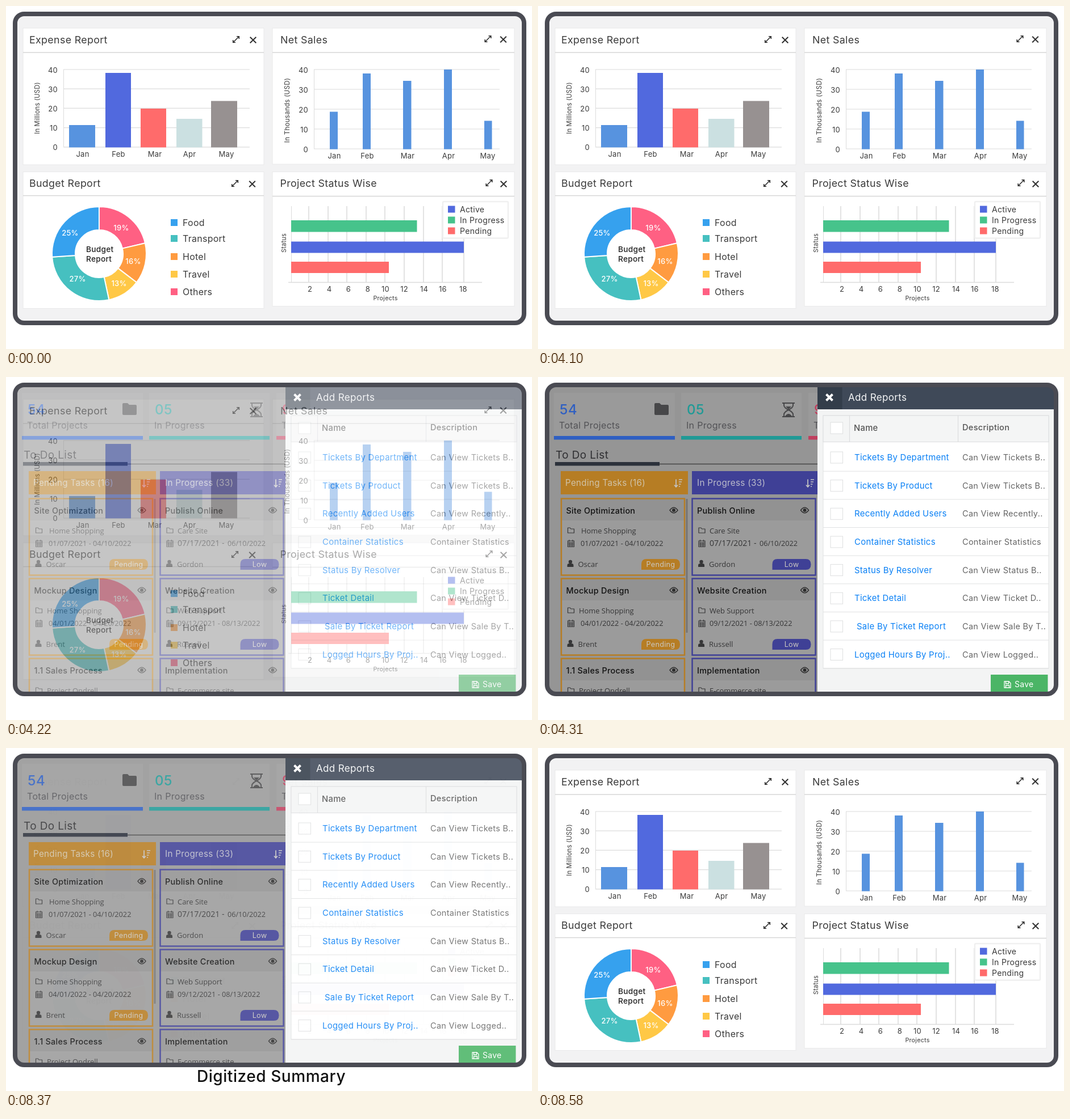
Write an HTML page that moves like this. It is 926 px wide and 605 px high and loops after 9580 ms.

```html
<!DOCTYPE html>
<html lang="en">
<head>
<meta charset="utf-8">
<title>Reports</title>
<style>
html, body { margin: 0; width: 100%; height: 100%; overflow: hidden; background: #fff; }
svg { display: block; width: 926px; height: 605px; }
text { font-family: Inter, sans-serif; letter-spacing: .02em; white-space: pre; }
.plain { font-family: "Open Sans", sans-serif; letter-spacing: 0; }
.bold { font-weight: 500; }
.mid { text-anchor: middle; }
.end { text-anchor: end; }
</style>
</head>
<body>
<svg id="stage" viewBox="0 0 926 605"></svg>
<script>
const LOOP = 9580;

const rect = (x, y, w, h, fill, more = '') =>
  `<rect x="${x}" y="${y}" width="${w}" height="${h}" fill="${fill}" ${more}/>`;
const text = (x, y, str, size, fill, cls = '', more = '') =>
  `<text x="${x}" y="${y}" font-size="${size}" fill="${fill}" class="${cls}" ${more}>${str}</text>`;
const path = (d, stroke, width = 1, fill = 'none', more = '') =>
  `<path d="${d}" stroke="${stroke}" stroke-width="${width}" fill="${fill}" ${more}/>`;
const at = (x, y, body) => `<g transform="translate(${x} ${y})">${body}</g>`;
const each = (list, fn) => list.map(fn).join('');

const INK = '#3b3b3b', GRID = '#dcdcdc', BLUE = '#5793df', INDIGO = '#5169de', RED = '#ff6b6b';

/* ---------- dashboard ---------- */

const cross = (x, y, r, color, width) =>
  at(x, y, path(`M${-r} ${-r}L${r} ${r}M${r} ${-r}L${-r} ${r}`, color, width));
const expand = (x, y) =>
  at(x, y, path('M-5 5L5 -5M1 -5.3H5.3V-1M-5.3 1V5.3H-1', '#333', 1.6));

function panel(x, y, w, h, line, title, tx, icons) {
  const [ex, ey, cx, cy] = icons;
  return rect(x, y, w, h, '#fff', 'stroke="#e9e9ea"') +
    path(`M${x} ${line}h${w}`, '#d6d6d6', 1.5) +
    text(tx, y + 26.5, title, 17.8, INK) +
    expand(ex, ey) + cross(cx, cy, 5.3, '#333', 2);
}

const sideTitle = (x, y, str, size) =>
  text(0, 0, str, size, INK, 'mid', `transform="translate(${x} ${y}) rotate(-90)"`);

function columns(x0, x1, y0, step, labelX, bars, nameY) {
  const base = y0 + 4 * step;
  return each([40, 30, 20, 10, 0], (n, i) =>
      path(`M${x0} ${y0 + i * step}H${x1}`, GRID, 1.2) +
      text(labelX, y0 + i * step + 5.5, n, 13, INK, 'end')) +
    path(`M${x0 + .5} ${y0}V${base}`, GRID) +
    each(bars, ([name, x, w, top, fill, mid]) =>
      rect(x, top, w, base + .6 - top, fill) + text(mid, nameY, name, 13, INK, 'mid'));
}

function slice(from, to, fill) {
  const p = (deg, r) => {
    const a = deg * Math.PI / 180;
    return `${(164 + r * Math.sin(a)).toFixed(1)} ${(437 - r * Math.cos(a)).toFixed(1)}`;
  };
  return path(`M${p(from, 42)}L${p(from, 83)}A83 83 0 0 1 ${p(to, 83)}L${p(to, 42)}A42 42 0 0 0 ${p(from, 42)}`,
    '#fff', 2, fill);
}

const SLICES = [
  [0, 77, '#ff6083', '19%', 203, 396], [77, 127.5, '#ff9b40', '16%', 224, 455],
  [127.5, 168, '#ffc846', '13%', 199, 494], [168, 266, '#46c0c0', '27%', 126, 486],
  [266, 360, '#36a1ee', '25%', 113, 405]];
const BUDGET = [
  ['Food', 382, '#36a1ee'], ['Transport', 410, '#46c0c0'], ['Hotel', 442, '#ff9b40'],
  ['Travel', 473, '#ffc846'], ['Others', 504, '#ff6083']];

const dashboard = () =>
  rect(16, 14, 896, 545, '#f2f2f3') +

  panel(30, 39, 424, 241, 82, 'Expense Report', 41, [405, 59, 435, 60]) +
  columns(101, 429, 112, 34.2, 91, [
    ['Jan', 111, 46, 210, BLUE, 135], ['Feb', 175, 45, 118, INDIGO, 198],
    ['Mar', 237, 45, 181, RED, 262], ['Apr', 300, 45.5, 199, '#cbe0e1', 323],
    ['May', 361, 46, 167.5, '#979191', 388]], 266) +
  sideTitle(59, 180, 'In Millions (USD)', 11.2) +

  panel(469, 39, 426, 240, 82, 'Net Sales', 483, [848.5, 58, 875.5, 59]) +
  columns(542, 869, 112, 35, 532, [
    ['Jan', 570, 14, 186.5, BLUE, 578], ['Feb', 628, 14, 119, BLUE, 636],
    ['Mar', 699, 14.5, 132, BLUE, 707], ['Apr', 771, 14, 112, BLUE, 779],
    ['May', 842, 13.5, 202.5, BLUE, 848]], 269) +
  sideTitle(499, 184, 'In Thousands (USD)', 11.6) +

  panel(30, 292.5, 424, 241, 334.5, 'Budget Report', 41, [403, 313, 433.5, 314]) +
  each(SLICES, ([from, to, fill]) => slice(from, to, fill)) +
  each(SLICES, ([, , , label, x, y]) => text(x, y, label, 13, '#fff', 'mid bold')) +
  text(141, 434, 'Budget', 13.7, '#222', 'bold') + text(141, 451, 'Report', 13.7, '#222', 'bold') +
  each(BUDGET, ([name, y, fill]) => rect(290, y - 6, 12, 12, fill) + text(311, y + 5.5, name, 15.9, INK)) +

  panel(469, 292.5, 426, 237, 335.5, 'Project Status Wise', 482.5, [850.5, 312, 876, 314]) +
  path('M502.5 353V487', GRID) +
  each([533, 567, 600, 634, 667, 701, 735, 768, 806], (x, i) =>
    path(`M${x} 353V487`, GRID, 1.6) +
    text([535, 569, 603, 637, 668, 701, 736, 769, 805][i], 504, 2 * i + 2, 13, INK, 'mid')) +
  path('M497 487.5H838', GRID, 1.3) +
  rect(502, 378, 221.5, 20.5, '#46c38b') + rect(502, 415.5, 304, 20, INDIGO) + rect(502, 451, 172, 20, RED) +
  sideTitle(493, 418, 'Status', 11) + text(668, 519, 'Projects', 10.8, INK, 'mid') +
  rect(769, 345, 115, 64.5, '#fff', 'rx="2" stroke="#f0f0f0" stroke-width="2.5"') +
  each([['Active', 358.5, INDIGO], ['In Progress', 377.5, '#46c38b'], ['Pending', 396.5, RED]],
    ([name, y, fill]) => rect(778, y - 6, 12.5, 12, fill) + text(799, y + 5.5, name, 14.1, INK));

/* ---------- task board with side drawer ---------- */

const ORANGE = '#b67d24', VIOLET = '#3f4096', DIM = '#363637';

const folder = (x, y) =>
  at(x, y, path('M-5.5 4.5V-4.5H-1.5L0 -2.5H5.5V4.5Z', DIM, 1.2, 'none', 'stroke-linejoin="round"'));
const calendar = (x, y) =>
  at(x, y, path('M-5.5 -4.5H5.5V6H-5.5ZM-5.5 -1.5H5.5M-5.5 1H5.5M-5.5 3.5H5.5M-2 -1.5V6M2 -1.5V6M-3 -6.5V-3M3 -6.5V-3', DIM, 1.1));
const person = (x, y) =>
  at(x, y, `<circle cy="-3" r="3.2" fill="${DIM}"/>` + path('M-5.5 6V3Q-5.5 0 -2 0H2Q5.5 0 5.5 3V6Z', 'none', 0, DIM));
const eye = (x, y) =>
  at(x, y, path('M-7 0Q0 -9.5 7 0Q0 9.5 -7 0Z', '#2d2d2d', 1.4) + '<circle r="3" fill="#2d2d2d"/>');
const sort = (x, y) =>
  at(x, y, path('M-4 -7V6M-7 3L-4 6.5L-1 3M1 -6.5H7M1 -2.5H6M1 1.5H4.5M1 5.5H3', '#c4c4c4', 1.7));
const badge = (x, y, color, str) =>
  at(x, y, path('M0 19V9Q0 0 9 0H59Q68 0 68 9.5T59 19Z', 'none', 0, color) +
    text(34, 14, str, 12.7, '#c9c6c0', 'mid'));

function tile(x, w, color, num, label) {
  return rect(x, 28, w, 77, '#9a9a9a') + rect(x, 104, w, 6.5, color) +
    text(x + 10, 66, num, 24, color, 'bold') + text(x + 9, 91, label, 16, '#525256');
}

function card(x, y, w, color, c) {
  const left = x + 17;
  return rect(x, y, w, 135.5, '#9b9b9b') + rect(x, y, w, 38.5, '#929292') +
    rect(x, y, w, 135, 'none', `stroke="${color}" stroke-width="2.5"`) +
    text(x + 8.5, y + 26.5, c.title, 14.4, '#111', 'bold') + eye(x + 198, y + 20.5) +
    folder(left, y + 56) + text(c.x, y + 61, c.site, 12.9, DIM, 'plain') +
    calendar(left, y + 79) + c.date(y + 83.5) +
    person(x + 16, y + 114.5) + text(x + 29.5, y + 120.5, c.who, 13, DIM, 'plain') +
    badge(x + 141, y + 106.5, color, c.tag);
}

const dates = (x, str) => y => text(x, y, str, 12.7, DIM, 'plain');
const PENDING = [
  { title: 'Site Optimization', site: 'Home Shopping', x: 76, date: dates(75, '01/07/2021 - 04/10/2022'), who: 'Oscar', tag: 'Pending' },
  { title: 'Mockup Design', site: 'Home Shopping', x: 72, date: dates(75, '04/01/2022 - 04/20/2022'), who: 'Brent', tag: 'Pending' },
  { title: '1.1 Sales Process', site: 'Project Ondrell', x: 72, date: dates(75, ''), who: '', tag: '' }];
const ACTIVE = [
  { title: 'Publish Online', site: 'Care Site', x: 302, who: 'Gordon', tag: 'Low',
    date: y => text(302, y, '07/17/2021 -', 14, DIM, 'plain') + text(390, y, '06/10/2022', 12.6, DIM, 'plain') },
  { title: 'Website Creation', site: 'Web Support', x: 302, date: dates(302, '09/12/2021 - 08/13/2022'), who: 'Russell', tag: 'Low' },
  { title: 'Implementation', site: 'E-commerce site', x: 302, date: dates(302, ''), who: '', tag: '' }];

const board = () =>
  rect(16, 14, 896, 545, '#959595') +
  tile(28, 213, '#2f5fc2', '54', 'Total Projects') +
  tile(252, 212, '#209a96', '05', 'In Progress') +
  tile(476, 40, '#c03f5e', '9', 'Total') +
  path('M205 65V48Q205 46 207 46H214L217 49H228Q230 49 230 51V65Q230 67 228 67H207Q205 67 205 65Z', 'none', 0, '#474749') +
  path('M430 46H452M430 70H452M433 46V50Q433 54 441 58Q449 54 449 50V46M433 70V66Q433 62 441 58Q449 62 449 66V70', '#474749', 2) +
  path('M436 52H446L441 57ZM435 69Q441 61 447 69Z', 'none', 0, '#474749') +
  text(31, 143.5, 'To Do List', 19, '#2f2f32') +
  rect(30, 150, 184, 6.5, '#2c313b') + path('M214 153.5H492', '#444', 1.3) +
  rect(40, 166, 224, 41, ORANGE) + text(48, 192, 'Pending Tasks (16)', 15.2, '#d0c3a8') + sort(247, 187.5) +
  rect(271, 166, 230, 41, VIOLET) + text(280, 192, 'In Progress (33)', 15.2, '#bcbccb') + sort(479, 187.5) +
  rect(260.5, 215, 3, 236, '#747474') +
  each(PENDING, (c, i) => card(41, 214.5 + 141 * i, 217, ORANGE, c)) +
  each(ACTIVE, (c, i) => card(271.5, 214.5 + 141 * i, 217, VIOLET, c));

const ROWS = [
  ['Tickets By Department', 'Can View Tickets B..'], ['Tickets By Product', 'Can View Tickets B..'],
  ['Recently Added Users', 'Can View Recently..'], ['Container Statistics', 'Container Statistics'],
  ['Status By Resolver', 'Can View Status B..'], ['Ticket Detail', 'Can View Ticket D..'],
  ['Sale By Ticket Report', 'Can View Sale By T..'], ['Logged Hours By Proj..', 'Can View Logged..']];

const checkbox = y => rect(515, y - 10, 21.5, 20, '#fff', 'stroke="#dedfe0"');

const drawer = () =>
  rect(492, 14, 424, 545, '#f3f4f4') +
  rect(492, 14, 424, 43, '#3f4958') + rect(492, 14, 43.5, 43, '#333d4a') +
  cross(513, 36, 5.5, '#fff', 4) + text(546, 42, 'Add Reports', 17, '#f4f5f6') +
  rect(502, 68, 397, 446, '#fff', 'stroke="#e0e1e2"') + rect(502, 68, 397, 46.5, '#f4f5f5', 'stroke="#dcdddf"') +
  path('M548.5 68V114M739.5 68V114', '#dcdddf', 1.2) + checkbox(90) +
  text(556, 95, 'Name', 14.8, '#555', 'bold') + text(747, 94, 'Description', 14.6, '#555', 'bold') +
  each(ROWS, ([name, about], i) => {
    const y = 142 + 49.65 * i;
    return path(`M502 ${y + 24.2}H899`, '#e0e1e2') + checkbox(y) +
      text(i == 6 ? 561 : 557, y + 5, name, 14.9, '#0a80f5') +
      text(747, y + 5, about, 14.5, '#666');
  }) +
  rect(797, 525, 100.5, 34, '#4bb566') +
  path('M821 537H829L832 540V548H821ZM823.5 537V541H828.5V537M823.5 548V544H829.5V548', '#fff', 1.3) +
  text(839, 547, 'Save', 14, '#fff');

/* ---------- stage and timing ---------- */

const caption = (id, y, str, size) => `<g id="${id}">${text(467, y, str, size, '#111', 'mid bold')}</g>`;

document.getElementById('stage').innerHTML =
  caption('first', 593, 'Pre-Defined Reports', 27.2) +
  caption('second', 589, 'Digitized Summary', 28) +
  '<clipPath id="screen"><rect x="16" y="14" width="896" height="545" rx="16"/></clipPath>' +
  `<g clip-path="url(#screen)"><g id="charts">${dashboard()}</g><g id="tasks">${board()}${drawer()}</g></g>` +
  rect(16, 14, 896, 545, 'none', 'rx="16" stroke="#4a4b53" stroke-width="8"');

const [first, second, charts, tasks] =
  ['first', 'second', 'charts', 'tasks'].map(id => document.getElementById(id));
const steps = (t, start, len) => Math.floor((t - start) / len);

// The caption drops from behind the screen in n steps of 100 ms.
function drop(el, t, start, end, n) {
  const k = Math.min(1, (steps(t, start, 100) + 1) / n);
  el.style.display = t >= start && t < end ? '' : 'none';
  el.setAttribute('transform', `translate(0 ${-36 * (1 - k)})`);
}

// The tasks fade in over the charts; later they fade out while the charts fade in beneath.
function blend(t) {
  const show = t < 4100 ? 0 : Math.min(1, steps(t, 4100, 30) / 7);
  const back = t < 8370 ? 0 : Math.min(1, (steps(t, 8370, 30) + 1) / 8);
  tasks.setAttribute('opacity', show * (1 - back));
  charts.setAttribute('opacity', t < 8370 ? 1 : back);
}

function draw() {
  const t = performance.now() % LOOP;
  drop(first, t, 1600, 4100, 5);
  drop(second, t, 5940, 8400, 4);
  blend(t);
  requestAnimationFrame(draw);
}
draw();
</script>
</body>
</html>
```
